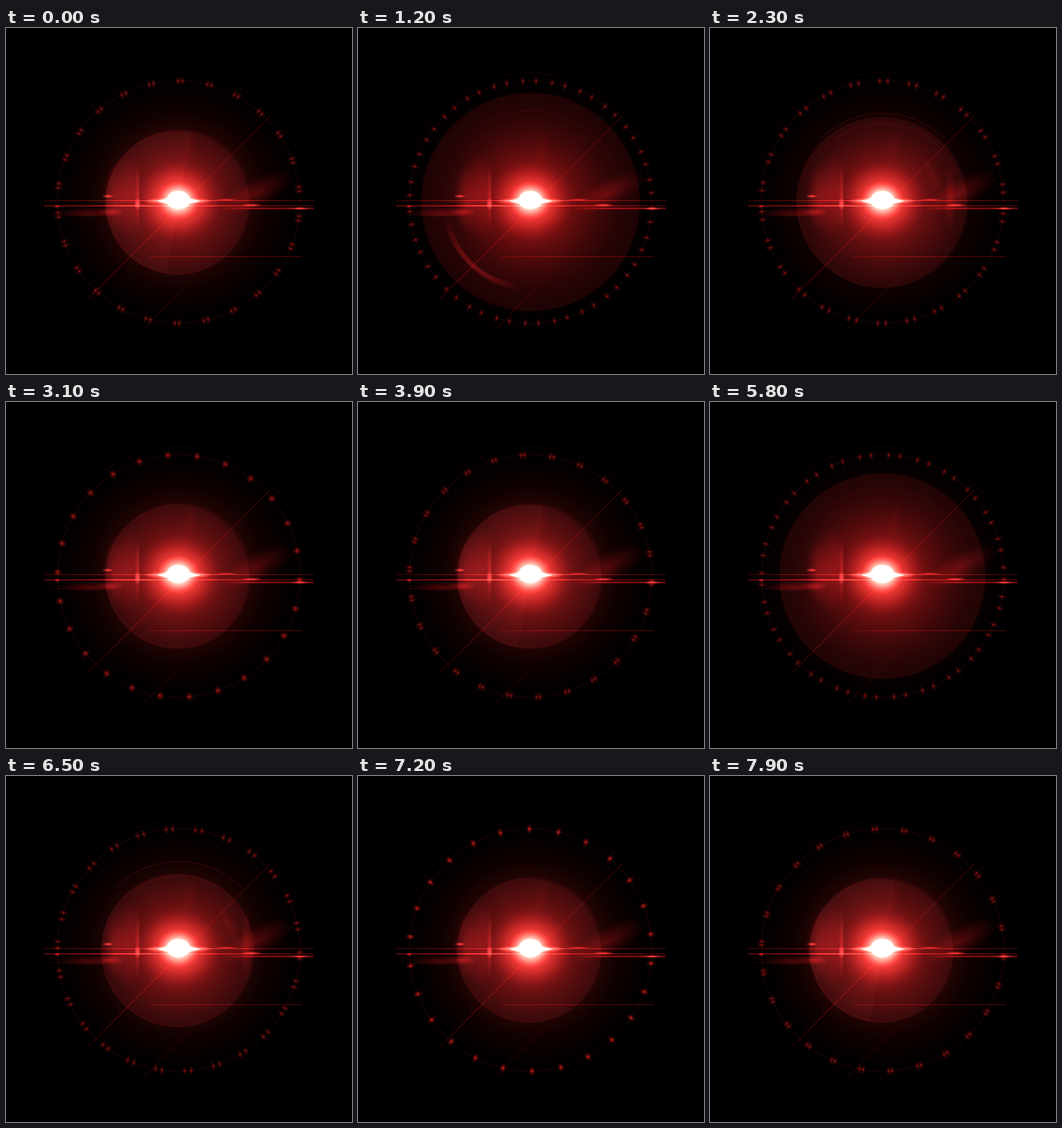
Animation of 500 by 500 pixels, one loop 8000 ms. Source, as an HTML page with a canvas:

```html
<!DOCTYPE html>
<html lang="en">
<head>
<meta charset="utf-8">
<title>Red lens flare</title>
<style>
html, body { margin: 0; width: 100%; height: 100%; overflow: hidden; background: #000; }
canvas { display: block; width: 100vw; height: 100vh; }
</style>
</head>
<body>
<canvas id="stage" width="500" height="500"></canvas>
<script>
const ctx = document.getElementById('stage').getContext('2d');
const CX = 249.5, CY = 251.5, TAU = Math.PI * 2;
const BEADS = 26, PITCH = 360 / BEADS, STEPS = 40;
const rad = deg => (deg - 90) * Math.PI / 180;
const red = (r, g, b, a = 1) => `rgba(${r},${g},${b},${a})`;

// Soft elliptical light; stops are [offset, colour] pairs
function glow(x, y, rx, ry, stops, turn = 0) {
  ctx.save();
  ctx.translate(x, y);
  ctx.rotate(turn);
  ctx.scale(rx, ry);
  const g = ctx.createRadialGradient(0, 0, 0, 0, 0, 1);
  stops.forEach(([o, c]) => g.addColorStop(o, c));
  ctx.fillStyle = g;
  ctx.fillRect(-1, -1, 2, 2);
  ctx.restore();
}

const fade = (r, g, b, a = 1) => [[0, red(r, g, b, a)], [0.5, red(r, g, b, a * 0.5)], [1, red(r, g, b, 0)]];

// Line whose brightness follows the given stops along its length
function ray(x1, y1, x2, y2, width, stops) {
  const g = ctx.createLinearGradient(x1, y1, x2, y2);
  stops.forEach(([o, c]) => g.addColorStop(o, c));
  ctx.strokeStyle = g;
  ctx.lineWidth = width;
  ctx.beginPath();
  ctx.moveTo(x1, y1);
  ctx.lineTo(x2, y2);
  ctx.stroke();
}

function arc(r, from, to, color, width, dash = []) {
  ctx.strokeStyle = color;
  ctx.lineWidth = width;
  ctx.setLineDash(dash);
  ctx.beginPath();
  ctx.arc(CX, CY, r, rad(from), rad(to));
  ctx.stroke();
  ctx.setLineDash([]);
}

function drawHaze() {
  glow(CX, 250, 172, 172, [
    [0, red(150, 22, 20)], [0.2, red(130, 20, 19)], [0.3, red(100, 14, 14)], [0.42, red(68, 8, 8)],
    [0.58, red(38, 4, 4)], [0.75, red(15, 1, 1)], [0.92, red(6, 0, 0)], [1, '#000']
  ]);
}

function drawDisc(n, open) {
  const r = 104 + 54 * open;
  const k = 1 - open;
  ctx.fillStyle = red(24, 3 + 3 * k, 4 + 3 * k);
  ctx.beginPath();
  ctx.arc(CX - 2 * k, CY + k, r, 0, TAU);
  ctx.fill();

  if (n < 4 || n > 32) {
    ctx.fillStyle = red(9, 3, 3);
    ctx.beginPath();
    ctx.moveTo(CX, CY);
    ctx.arc(CX - 2, CY + 1, r - 1, rad(189), rad(371));
    ctx.fill();
  }
  arc(r, 0, 360, red(70, 9, 9, 0.25 + 0.2 * k), 1.5, [1, 3]);
  arc(r - 26 * open, -35, 70, red(60, 8, 8, 0.35), 1);

  // Sweeping reflection while the disc is wide
  const shine = Math.max(0, 1 - Math.abs(n - 11) / 7);
  if (shine) {
    const at = 30 + 96 * (n - 10);
    for (let i = 0; i < 9; i++) {
      const half = 34 - i * 3.4;
      arc(112 + 6 * (n - 10), at - half, at + half, red(100, 14, 14, 0.09 * shine), 9 - i * 0.8);
    }
  }
  if (n > 18 && n < 29) {
    glow(347, 245, 9, 50, fade(75, 10, 10, 0.5));
    glow(322, 215, 9, 35, fade(55, 8, 8, 0.35), -0.45);
    arc(128, -45, 45, red(75, 7, 7, 0.6), 1);
  }
}

function drawRim(n) {
  arc(175, 0, 360, red(95, 9, 9, 0.6), 2, [1.2, 3.2]);
  arc(179, 0, 360, red(65, 6, 6, 0.4), 1, [1, 4]);
  arc(186.5, -70, 70, red(75, 4, 4, 0.5), 1, [2, 2]);
  arc(186.5, 130, 230, red(70, 4, 4, 0.4), 1, [1, 3]);

  const gap = 2.1 + n * PITCH / STEPS;
  const mid = 0.8 + n * 4.5 + (n > 32 ? PITCH / 2 : 0);
  for (let i = 0; i < BEADS; i++) {
    for (const side of [-1, 1]) {
      const a = rad(mid + side * gap / 2 + i * PITCH);
      const x = CX + 175 * Math.cos(a), y = CY + 175 * Math.sin(a);
      glow(x, y, 7.5, 4, fade(105, 11, 10, 0.7), a);
      glow(x, y, 2.6, 1.6, fade(100, 22, 18, 0.7), a);
    }
  }
}

function drawSideLights() {
  ctx.save();
  ctx.beginPath();
  ctx.rect(135, 180, 58, 150);
  ctx.clip();
  glow(174, 243, 36, 60, fade(72, 13, 15, 0.8));
  ctx.restore();
  glow(156, 247, 16, 48, fade(48, 8, 9, 0.7));
  glow(190, 245, 4, 45, fade(85, 20, 20, 0.5));
  glow(190, 254, 5, 9, fade(180, 70, 65, 0.7));
  glow(147, 243, 9, 2.6, fade(190, 50, 48));
  glow(362, 238, 58, 20, fade(70, 8, 9, 0.8), -0.5);
  glow(265, 175, 10, 32, fade(40, 5, 6, 0.3), 0.2);
  glow(120, 267, 52, 7, fade(75, 7, 10, 0.75));
  glow(150, 266, 20, 6, fade(70, 10, 12, 0.8));
}

function drawRays() {
  const c = (r, g = 12, b = 12, a = 1) => red(r, g, b, a);
  ray(119, 391, 382, 127, 1, [
    [0, c(75, 4, 4)], [0.15, c(110, 8, 8)], [0.38, c(80, 8, 8)], [0.5, c(25, 0, 0)], [0.7, c(65, 7, 7)], [1, c(85, 5, 5)]
  ]);
  ray(197, 437, 270, 364, 1, [[0, c(55, 3, 3)], [0.6, c(55, 3, 3)], [1, c(20, 0, 0)]]);
  ray(385, 246, 420, 211, 1, [[0, c(15, 0, 0)], [1, c(45, 3, 3)]]);
  ray(205, 330.5, 428, 330.5, 1, [[0, c(40, 3, 3)], [0.3, c(75, 6, 6)], [1, c(85, 5, 5)]]);
  ray(55, 249.5, 445, 249.5, 1, [
    [0, c(70, 5, 7)], [0.35, c(110, 20, 20)], [0.5, c(255, 130, 110)], [0.65, c(120, 25, 25)], [1, c(70, 5, 7)]
  ]);
  ray(55, 257, 445, 257, 1.6, [
    [0, c(110, 8, 12)], [0.2, c(150, 20, 22)], [0.36, c(190, 60, 54)], [0.65, c(110, 18, 20)], [1, c(70, 6, 8)]
  ]);
  ray(310, 260.7, 445, 260.7, 2.4, [
    [0, c(60, 0, 0, 0)], [0.35, c(110, 14, 16)], [0.7, c(110, 11, 13)], [0.86, c(180, 38, 38)], [1, c(85, 5, 8)]
  ]);
  ray(55, 270, 165, 270, 1, [[0, c(22, 0, 0)], [0.6, c(50, 5, 7)], [1, c(50, 0, 0, 0)]]);
  glow(355, 256, 16, 2.4, fade(190, 45, 45));
  glow(318, 248, 18, 1.8, fade(150, 28, 28));
  glow(74, 258, 5, 3, fade(150, 25, 25));
  glow(425, 261, 10, 2.2, fade(130, 30, 30));
}

function drawCore() {
  glow(249, 250, 62, 58, [
    [0, red(200, 90, 80)], [0.3, red(150, 72, 64, 0.9)], [0.5, red(100, 38, 34, 0.7)],
    [0.75, red(60, 14, 13, 0.5)], [1, red(40, 5, 5, 0)]
  ]);
  glow(249, 249, 30, 27, [
    [0, red(255, 235, 225)], [0.5, red(230, 150, 140, 0.8)], [0.75, red(150, 85, 78, 0.5)], [1, red(110, 40, 36, 0)]
  ]);
  glow(249, 250, 50, 5.5, [[0, '#fff'], [0.5, red(255, 170, 155, 0.75)], [1, red(255, 60, 50, 0)]]);
  glow(249, 248.5, 18, 13.5, [[0, '#fff'], [0.65, '#fff'], [1, red(255, 200, 190, 0)]]);
  ctx.fillStyle = '#fff';
  ctx.beginPath();
  ctx.moveTo(220, 250);
  ctx.quadraticCurveTo(237, 248, 249, 239);
  ctx.quadraticCurveTo(261, 248, 280, 250.5);
  ctx.quadraticCurveTo(262, 252.5, 249, 260);
  ctx.quadraticCurveTo(237, 253, 220, 250);
  ctx.fill();
}

function draw(n) {
  const open = n < 26 ? Math.sin(Math.PI * n / 26) : 0;
  ctx.globalCompositeOperation = 'source-over';
  ctx.fillStyle = '#000';
  ctx.fillRect(0, 0, 500, 500);
  ctx.globalCompositeOperation = 'lighter';
  drawHaze();
  drawDisc(n, open);
  drawRim(n);
  drawSideLights();
  drawRays();
  drawCore();
}

const start = performance.now();
let shown = -1;
function tick() {
  const n = Math.floor((performance.now() - start) / 100) % STEPS;
  if (n !== shown) draw(shown = n);
  requestAnimationFrame(tick);
}
tick();
</script>
</body>
</html>
```
